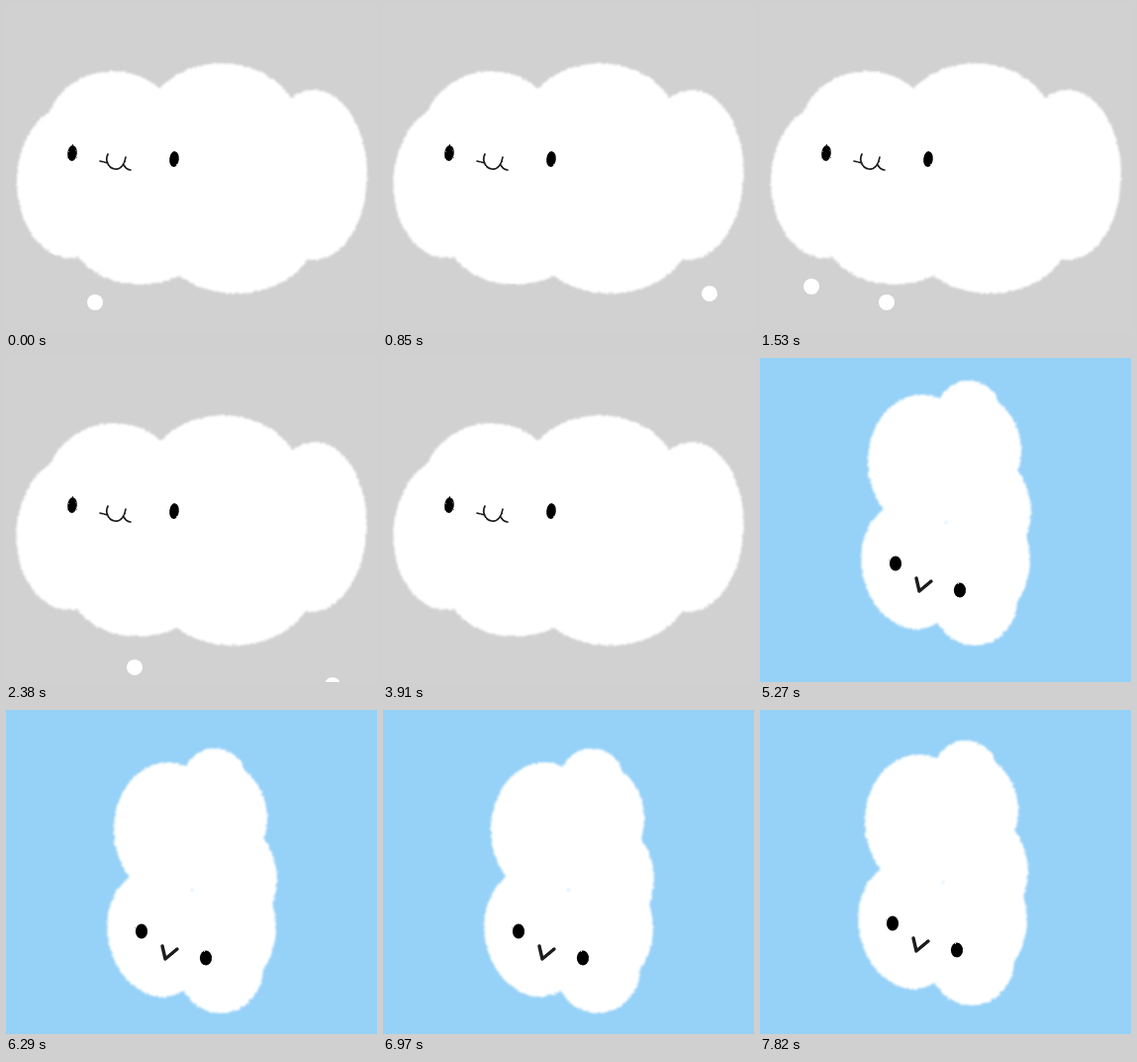
These frames come from a looping animation (375x328 px, 7.99 s). An HTML page:

```html
<!DOCTYPE html>
<html lang="en">
<head>
<meta charset="utf-8">
<title>Clouds</title>
<style>
  html, body { margin: 0; width: 100%; height: 100%; overflow: hidden; background: #d1d1d1; }
  svg { display: block; width: 100%; height: 100%; }
  .puffs, #drops { fill: #fff; }
  .puffs { filter: url(#chalk); }
  .face { filter: url(#ink); }
  .face path { fill: none; stroke: #1c1c1c; stroke-linecap: round; stroke-linejoin: round; }
</style>
</head>
<body>
<svg viewBox="0 0 375 328">
  <defs>
    <filter id="chalk" filterUnits="userSpaceOnUse" x="0" y="0" width="375" height="328" color-interpolation-filters="sRGB">
      <feTurbulence id="grain" type="fractalNoise" baseFrequency=".35" numOctaves="2"/>
      <feDisplacementMap in="SourceGraphic" scale="4" xChannelSelector="R" yChannelSelector="G"/>
      <feGaussianBlur stdDeviation=".8"/>
    </filter>
    <filter id="ink" filterUnits="userSpaceOnUse" x="0" y="0" width="375" height="328" color-interpolation-filters="sRGB">
      <feTurbulence type="fractalNoise" baseFrequency=".4" numOctaves="2" seed="4"/>
      <feDisplacementMap in="SourceGraphic" scale="1.8" xChannelSelector="R" yChannelSelector="G"/>
    </filter>
  </defs>
  <rect id="sky" width="375" height="328"/>
  <g id="drops"></g>
</svg>
<script>
const STEP = 170, FRAMES = 47, RAIN_FRAMES = 24, CYCLE = 8;
const FALL = 40, DROP_Y = 300;
const svg = document.querySelector('svg');
const $ = id => document.getElementById(id);
const set = (el, attrs) => { for (const k in attrs) el.setAttribute(k, attrs[k]); };

function add(parent, tag, attrs = {}) {
  const el = document.createElementNS('http://www.w3.org/2000/svg', tag);
  set(el, attrs);
  return parent.appendChild(el);
}

const oval = (parent, cx, cy, rx, ry, tilt = 0) =>
  add(parent, 'ellipse', { cx, cy, rx, ry, transform: `rotate(${tilt} ${cx} ${cy})` });

// A cloud is a union of ovals, each given as cx, cy, rx, ry, tilt.
function makeCloud({ puffs, eyes, eyeSize, mouth, line }) {
  const root = add(svg, 'g');
  const body = add(add(root, 'g', { class: 'puffs' }), 'g');
  puffs.forEach(puff => oval(body, ...puff));
  const face = add(root, 'g', { class: 'face' });
  eyes.forEach(eye => oval(face, ...eye, ...eyeSize));
  add(face, 'path', { d: mouth, 'stroke-width': line });
  return { root, body };
}

const wide = makeCloud({
  puffs: [
    [108, 128, 68, 62], [218, 128, 81, 70], [311, 171, 54, 86],
    [232, 225, 83, 66], [136, 222, 74, 60], [66, 178, 55, 77]
  ],
  eyes: [[67, 149], [170, 155]],
  eyeSize: [4.8, 7.9, 6],
  mouth: 'M103,150c-3,6 0,14 7,15c6,1 10,-5 11,-12M95,157l8,2M119,161q3,5 7,5',
  line: 1.7
});

const tall = makeCloud({
  puffs: [
    [163, 105, 54, 68], [211, 54, 32, 31], [216, 94, 48, 57], [231, 155, 43, 55],
    [225, 205, 48, 60], [217, 245, 43, 46], [153, 210, 50, 65, -12]
  ],
  eyes: [[137, 208], [202, 235]],
  eyeSize: [6.1, 7.6],
  mouth: 'M158,223l3,13l12,-10',
  line: 3.4
});

// Each drop passes DROP_Y at its own moment of the cycle.
const drops = [[90, 0], [52, 1.4], [128, 1], [130, 5.67], [330, 5.22]].map(([cx, moment]) =>
  ({ el: add($('drops'), 'circle', { cx, r: 8 }), moment }));

function drawRain(frame) {
  set(wide.body, { transform: `translate(0 150) skewX(${-0.55 * (frame % 3)}) translate(0 -150)` });
  for (const { el, moment } of drops) {
    const steps = (frame - moment + CYCLE * 1.5) % CYCLE - CYCLE / 2;
    set(el, { cy: DROP_Y + FALL * steps });
  }
}

function drawBounce(frame) {
  const phase = (frame + 1) % CYCLE;
  const dip = Math.min(8 * Math.min(phase, CYCLE - phase), 25);
  const sway = phase % 2 ? -3 : 0;
  set(tall.root, { transform: `translate(${sway} ${dip})` });
}

function draw(frame) {
  const raining = frame < RAIN_FRAMES;
  set($('sky'), { fill: raining ? '#d1d1d1' : '#96d1f8' });
  set($('grain'), { seed: 1 + frame % 3 });
  for (const el of [$('drops'), wide.root]) el.style.display = raining ? '' : 'none';
  tall.root.style.display = raining ? 'none' : '';
  (raining ? drawRain : drawBounce)(frame);
}

let shown = -1;
function tick() {
  const frame = Math.floor(performance.now() / STEP) % FRAMES;
  if (frame !== shown) draw(shown = frame);
  requestAnimationFrame(tick);
}
tick();
</script>
</body>
</html>
```
